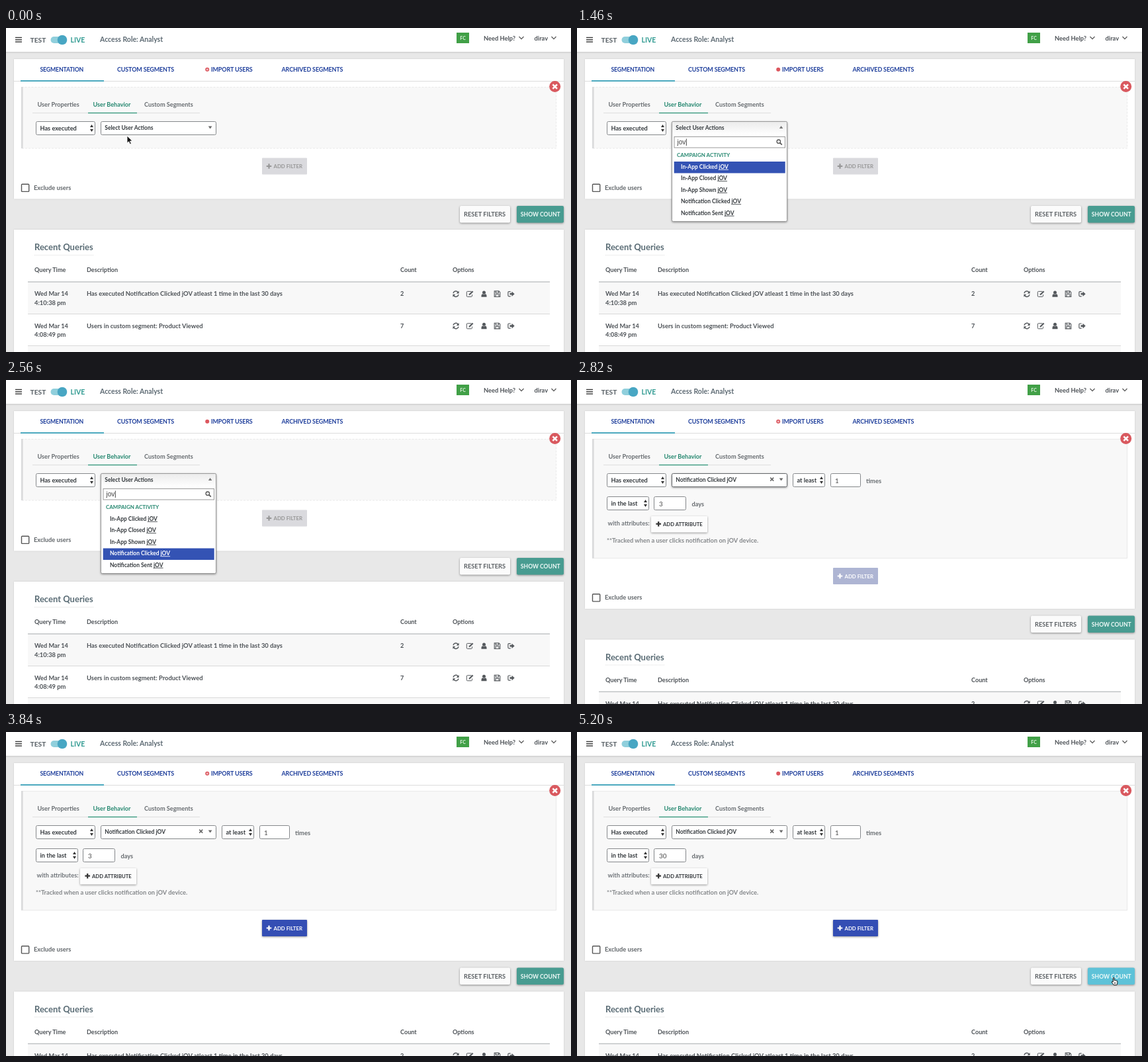
Animation, 854 px wide and 490 px high, one loop 5220 ms. Source, as an HTML page:

```html
<!DOCTYPE html>
<html lang="en">
<head>
<meta charset="utf-8">
<title>Segmentation</title>
<style>
  html, body { margin: 0; width: 100%; height: 100%; overflow: hidden; background: #e8e8e8; }
  svg { display: block; width: 854px; height: 490px; }
  text { font-family: Lato, "Open Sans", sans-serif; font-weight: 700; }
  .raised { filter: drop-shadow(0 1px 1.5px rgba(0, 0, 0, .4)); }
  .card { filter: drop-shadow(0 0 1px rgba(0, 0, 0, .12)); }
  .u { text-decoration: underline; }
</style>
</head>
<body>
<svg id="stage" viewBox="0 0 854 490" xmlns="http://www.w3.org/2000/svg"></svg>
<script>
const LOOP = 5220, PULSE = 560, SHIFT = 87.5, OPENED = 320, CHOSEN = 2730;
const INK = '#4d5257', DARK = '#34393d', BLUE = '#1f3f9c', GREEN = '#24876f', PICK = '#3453b4';

const text = (x, y, s, size = 9.2, fill = INK, extra = '') =>
  `<text x="${x}" y="${y}" font-size="${size}" fill="${fill}" ${extra}>${s}</text>`;
const rect = (x, y, w, h, fill, extra = '') =>
  `<rect x="${x}" y="${y}" width="${w}" height="${h}" fill="${fill}" ${extra}/>`;
const line = (d, stroke, width = 1, extra = '') =>
  `<path d="${d}" fill="none" stroke="${stroke}" stroke-width="${width}" ${extra}/>`;
const shape = (d, fill, extra = '') => `<path d="${d}" fill="${fill}" ${extra}/>`;
const group = (id, body, extra = '') => `<g id="${id}" ${extra}>${body}</g>`;
const field = (x, y, w, id = '') =>
  rect(x + .5, y + .5, w - 1, 20, '#fff', `rx="2" stroke="#85888b" ${id && `id="${id}"`}`);
const plus = (x, y, fill) =>
  line(`M${x - 3.8} ${y}h7.6M${x} ${y - 3.8}v7.6`, fill, 2.2);
const select = (x, y, w, label) => field(x, y, w) + text(x + 6.5, y + 13.5, label, 9.2, DARK) +
  shape(`M${x + w - 8} ${y + 9}l2.5 -4l2.5 4zM${x + w - 8} ${y + 12}l2.5 4l2.5 -4z`, '#333');
const chevron = x => line(`M${x} 13l3.5 3.7l3.5 -3.7`, '#555', 1.2);

function header() {
  return rect(0, 36, 854, 1, '#cfcfcf') + rect(0, 37, 854, 1.5, '#dedede') + rect(0, 0, 854, 36, '#fff') +
    line('M14 14.5h10M14 17.8h10M14 21.1h10', '#444', 1.5) +
    text(36.5, 21.5, 'TEST', 10.3, '#555d63') +
    rect(67.5, 13, 22, 10, '#90cfdc', 'rx="5"') + '<circle cx="85" cy="18" r="7.3" fill="#48a6c3"/>' +
    text(97.5, 21.5, 'LIVE', 10.5, '#339c93') +
    text(142, 21.3, 'Access Role: Analyst', 10.5, '#5d6a73') +
    rect(681, 7, 19, 16, '#41a047') +
    text(690.6, 17.6, 'FC', 7, '#e4f3e4', 'text-anchor="middle"') +
    text(722, 18.6, 'Need Help?', 9.3) + chevron(775.5) +
    text(798.5, 18.6, 'dirav', 9.3) + chevron(824.5);
}

function tabs() {
  const tab = (x, s) => text(x, 66.3, s, 9, BLUE, 'letter-spacing="-.15"');
  return rect(12, 80, 831, 1, '#dcdcdc') + rect(22, 79, 126, 2, '#4ba9bf') +
    text(51.5, 66.3, 'SEGMENTATION', 8.7, BLUE, 'letter-spacing="-.15"') +
    tab(168, 'CUSTOM SEGMENTS') + tab(310, 'IMPORT USERS') + tab(416.5, 'ARCHIVED SEGMENTS') +
    '<circle cx="304.2" cy="62.8" r="3" fill="#dc565e"/>' +
    '<circle id="pulse" cx="304.2" cy="62.8" r="1.5" fill="#f0b9bd"/>';
}

function panel() {
  return rect(23.5, 89.5, 808, 92.5, '#f8f8f8', 'id="panel" stroke="#e9e9e9" stroke-dasharray="3 2"') +
    rect(23, 89, 2.6, 93, '#d9dadb', 'id="edge"') +
    '<circle cx="829.7" cy="88.6" r="8.5" fill="#d9595f"/>' +
    line('M826.4 85.3l6.6 6.6M833 85.3l-6.6 6.6', '#fff', 2.6) +
    rect(40, 128, 253, 1, '#dedede') + rect(124, 127.8, 74, 1.4, '#38997f') +
    text(47.5, 118.7, 'User Properties', 9.15, '#676c70') +
    text(131.5, 118.7, 'User Behavior', 9.1, GREEN) +
    text(209, 118.7, 'Custom Segments', 9.2, '#676c70') +
    select(45, 141, 90, 'Has executed') +
    field(143, 141, 175, 'action') +
    text(149.3, 154, 'Select User Actions', 8.5, DARK, 'id="label"') +
    shape('M305.8 148.5h5.6l-2.8 4z', '#666');
}

function details() {
  const digits = (x, y, id, s) => text(x, y, s, 9.9, '#484848', `id="${id}" style="font-weight:400"`);
  return line('M292.2 147.6l5 5M297.2 147.6l-5 5', '#666', 1.5) +
    select(326, 141, 49, 'at least') + field(383, 141, 46) + digits(390, 155.5, 'times', '1') +
    text(437, 155.6, 'times', 9.4, '#666b6f') +
    select(45, 176, 64, 'in the last') + field(116, 176, 49, 'dayBox') + digits(124, 190.5, 'days', '3') +
    rect(135.8, 181.5, 1, 11, '#333', 'id="dayCaret"') +
    text(173.5, 190.6, 'days', 9.2, '#666b6f') +
    text(46.5, 220.3, 'with attributes:', 9.3, '#70757a') +
    rect(112, 206, 85, 24.5, '#fcfcfc', 'class="raised" rx="1"') + plus(123.2, 217.7, '#333') +
    text(130, 220.7, 'ADD ATTRIBUTE', 7.7, '#33373b') +
    text(45, 246.2, '**Tracked when a user clicks notification on jOV device.', 9.32, '#85888b');
}

function icons(y) {
  const c = '#55595d';
  const arc = 'M-4 -1A4 4 0 0 1 3.2 -2.5M4 1A4 4 0 0 1 -3.2 2.5';
  const at = (x, body) => `<g transform="translate(${x} ${y})">${body}</g>`;
  return at(680, line(arc, c, 1.5) + shape('M4.6 -4.6v4h-4zM-4.6 4.6v-4h4z', c)) +
    at(701, line('M2.5 -3.8h-6a1.2 1.2 0 0 0 -1.2 1.2v5.6a1.2 1.2 0 0 0 1.2 1.2h5.8a1.2 1.2 0 0 0 1.2 -1.2v-2', c) +
      line('M-1 1.4L4.7 -4', c, 2.1)) +
    at(722.5, `<circle cy="-2.3" r="2.5" fill="${c}"/>` + shape('M-4 4.6v-2q0 -2.4 2 -2.6q2 1.2 4 0q2 .2 2 2.6v2z', c)) +
    at(742.5, line('M-4.3 -4.3h6.8l1.8 1.8v6.8h-8.6zM-2.3 -4v2.7h4.3v-2.7M-2.5 4v-3.2h5v3.2', c, 1.1)) +
    at(763.5, line('M-.8 -3.6h-2.6q-1.2 0 -1.2 1.2v4.8q0 1.2 1.2 1.2h2.6', c, 1.2) +
      shape('M-2 -1.4h3v-2.4l4.2 3.8l-4.2 3.8v-2.4h-3z', c));
}

function lower() {
  const row = (y, clock, desc, count) =>
    text(43, y, 'Wed Mar 14') + text(43, y + 13.3, clock, 9.4) +
    text(122, y, desc, 9.4) + text(596, y, count) + icons(y - 3);
  const head = (x, s) => text(x, 369.4, s, 9.1);
  return rect(387, 196.5, 68, 25, '#dadada', 'id="add" rx="1"') +
    group('addInk', plus(397.5, 209, 'currentColor') +
      text(404.5, 212, 'ADD FILTER', 7.8, 'currentColor')) +
    rect(23.5, 236.2, 11.2, 11.2, '#fff', 'stroke="#555" stroke-width="1.4" rx="1"') +
    text(42, 244.8, 'Exclude users', 9.3, '#62676b') +
    rect(686, 269, 76, 25.5, '#fbfbfb', 'class="raised" rx="2"') +
    text(692, 285.3, 'RESET FILTERS', 9.25, '#5c6165') +
    rect(772, 269, 71, 25.5, '#489c91', 'id="count" class="raised" rx="2"') +
    text(777.8, 285.1, 'SHOW COUNT', 8.6, '#f2fbf9') +
    rect(12, 305, 831, 260, '#fff', 'class="card"') +
    text(43, 336, 'Recent Queries', 13, '#5a6c75') +
    line('M43 343.5h90', '#ddd', 1, 'stroke-dasharray="1 1"') +
    head(43, 'Query Time') + head(122, 'Description') + head(596, 'Count') + head(675, 'Options') +
    rect(33, 384, 789, 48, '#f8f8f8') + rect(33, 383.3, 789, 1.3, '#b9bcbe') +
    rect(33, 432, 789, 1, '#d9d9d9') + rect(33, 480.5, 789, 48, '#f8f8f8') + rect(33, 480, 789, 1, '#d9d9d9') +
    row(405.2, '4:10:38 pm', 'Has executed Notification Clicked jOV atleast 1 time in the last 30 days', '2') +
    row(453.6, '4:08:49 pm', 'Users in custom segment: Product Viewed', '7');
}

// Entries starting with # are group headings.
const ALL = ['#LIFECYCLE', 'App/Site Opened', 'Viewed Web Page', '#ACQUISITION', 'INSTALL', '#UNINSTALL',
  'Device Uninstall', '#REACHABILITY', 'Accepted Web Push Soft-ask', 'Allowed Web Push Subscription',
  'Closed Web Push Soft-ask', 'Denied Web Push Subscription', 'Dismissed Web Push Subscription',
  'Displayed Web Push Subscription', 'Overlay clicked in 1-click HTTP'];
const MATCHES = ['#CAMPAIGN ACTIVITY', 'In-App Clicked', 'In-App Closed', 'In-App Shown',
  'Notification Clicked', 'Notification Sent'];

const list = (items, prefix, tail = '') => items.map((s, i) => {
  const y = 195.3 + 17.5 * i;
  return s[0] === '#' ? text(151, y, s.slice(1), 8, GREEN)
    : text(157, y, s + tail, 8.45, DARK, `id="${prefix}${i}"`);
}).join('');

function dropdown() {
  return rect(143.5, 141.5, 174, 325.5, '#fff', 'id="box" class="raised" rx="2" stroke="#9a9a9a"') +
    rect(144, 142, 173, 20, 'url(#fade)', 'rx="2"') +
    text(149.3, 154, 'Select User Actions', 8.5, DARK) +
    shape('M305.8 152h5.6l-2.8 -4z', '#777') +
    rect(147, 164.5, 167.5, 16.5, '#fff', 'stroke="#999"') +
    '<circle cx="304.8" cy="171.7" r="2.7" fill="none" stroke="#555" stroke-width="1.3"/>' +
    line('M306.8 173.7l3 3', '#555', 1.7) +
    text(151.5, 176, '', 10, '#444', 'id="typed" style="font-family:\'Liberation Sans\',Arial,sans-serif;font-weight:400"') +
    rect(0, 167.5, 1, 10.5, '#444', 'id="caret"') +
    rect(146.7, 202, 168, 17.5, PICK, 'id="pick"') +
    group('all', list(ALL, 'a') + text(157, 451, 'subscription', 8.45, DARK) +
      text(157, 467.5, 'Overlay shown in 1-click HTTP', 8.45, DARK), 'clip-path="url(#crop)"') +
    group('found', list(MATCHES, 'm', ' <tspan class="u">jOV</tspan>'));
}

const cursors = group('arrow',
    shape('M0 0v11.2l2.6 -2.4l1.8 4l2 -.9l-1.8 -3.9h3.5z', '#111', 'stroke="#fff" stroke-width=".9"')) +
  group('beam', line('M-2 -5.5q2 0 2 1.5v8q0 1.5 -2 1.5M2 -5.5q-2 0 -2 1.5M2 5.5q-2 0 -2 -1.5', '#333')) +
  group('hand', shape('M-1.7 -5q1 -1.2 1.8 0v3.7q.9 -.8 1.7 .2q1 -.6 1.6 .3q1.4 -.4 1.4 1v2.3q0 1.5 -1 3.2h-4.5q-1.6 -2 -3.2 -4.6q.5 -1.4 2.2 -.1z',
    '#fff', 'stroke="#111" stroke-width="1"') + line('M.4 1.5v2.5M2 1.5v2.5', '#111', .7));

const stage = document.getElementById('stage');
stage.innerHTML = `<defs>
  <linearGradient id="fade" x2="0" y2="1"><stop stop-color="#ececec"/><stop offset="1" stop-color="#fff"/></linearGradient>
  <clipPath id="crop"><rect x="144" y="184" width="173" height="280.5"/></clipPath></defs>` +
  rect(0, 0, 854, 490, '#e8e8e8') + header() +
  rect(12, 47, 831, 211.5, '#fff', 'id="card" class="card"') +
  tabs() + panel() + group('details', details()) + group('lower', lower()) +
  group('dropdown', dropdown()) + cursors;

const el = {};
stage.querySelectorAll('[id]').forEach(e => el[e.id] = e);
const set = (id, name, value) => el[id].setAttribute(name, value);
const show = (id, on) => set(id, 'visibility', on ? 'visible' : 'hidden');
const clamp = v => Math.max(0, Math.min(1, v));
const ramp = (t, from, span) => clamp((t - from) / span);
const mix = (a, b, k) => `rgb(${a.map((v, i) => Math.round(v + (b[i] - v) * k))})`;
// Value of the last step whose time has come.
const step = (t, steps) => steps.reduce((v, s) => t >= s[0] ? s[1] : v, steps[0][1]);

// time, x, y of the pointer
const PATH = [[0, 183, 163], [120, 183, 163], [240, 188, 152], [980, 188, 152], [2980, 188, 152],
  [3100, 188, 152], [3380, 143, 187], [4180, 143, 187], [4560, 811, 376], [5220, 812, 377]];

function pointer(t) {
  const i = Math.max(1, PATH.findIndex(p => p[0] >= t));
  const [a, b] = [PATH[i - 1], PATH[i]];
  const k = ramp(t, a[0], b[0] - a[0]), e = k * k * (3 - 2 * k);
  return [a[1] + (b[1] - a[1]) * e, a[2] + (b[2] - a[2]) * e];
}

function draw(t) {
  const chosen = t >= CHOSEN, dy = chosen ? SHIFT : 0;
  set('lower', 'transform', `translate(0 ${dy})`);
  set('card', 'height', 211.5 + dy);
  set('panel', 'height', 92.5 + dy);
  set('panel', 'stroke-dasharray', chosen ? 'none' : '3 2');
  set('edge', 'height', 93 + dy);
  show('details', chosen);
  el.label.textContent = chosen ? 'Notification Clicked jOV' : 'Select User Actions';
  const focused = chosen && t < 3480;
  set('action', 'stroke', focused ? '#66696c' : '#85888b');
  set('action', 'class', focused ? 'raised' : '');

  const phase = t % PULSE;
  set('pulse', 'opacity', 1 - ramp(phase, 40, 80) + ramp(phase, 380, 80));

  // Dropdown
  const open = t >= OPENED && !chosen, found = t >= 1260;
  const typed = step(t, [[0, ''], [1020, 'j'], [1140, 'jo'], [1220, 'jov']]);
  el.dropdown.style.display = open ? '' : 'none';
  if (open) {
    el.typed.textContent = typed;
    set('caret', 'x', 152 + el.typed.getComputedTextLength());
    set('box', 'height', found ? 151 : 325.5);
    show('all', !found);
    show('found', found);
    const row = step(t, [[0, 1], [1780, 2], [1920, 3], [2180, 4]]);
    set('pick', 'y', 184.5 + 17.5 * row);
    set('a1', 'fill', '#fff');
    for (let i = 1; i < MATCHES.length; i++) set('m' + i, 'fill', i === row ? '#fff' : DARK);
  }

  // Buttons
  const k = ramp(t, 2740, 300);
  set('add', 'fill', mix([218, 218, 222], [52, 78, 180], k));
  set('add', 'class', k > .6 ? 'raised' : '');
  set('addInk', 'color', k ? '#fff' : '#969696');
  const hover = ramp(t, 4530, 60), press = ramp(t, 5080, 80);
  set('count', 'fill', press ? mix([91, 162, 152], [94, 194, 216], press) : mix([72, 156, 145], [91, 162, 152], hover));

  el.days.textContent = t < 4020 ? '3' : '30';
  const editing = t >= 3480 && t < 5080;
  const blinkOn = t >= 4540 ? t < 4800 : (t - 3480) % 400 < 200;
  show('dayCaret', chosen && editing && blinkOn);
  set('dayCaret', 'x', t < 4020 ? 130 : 135.8);

  // Pointer
  const [x, y] = pointer(t);
  const look = step(t, [[0, 'arrow'], [980, ''], [3080, 'arrow'], [3360, 'beam'], [3760, ''],
    [4180, 'arrow'], [4530, 'hand']]);
  for (const id of ['arrow', 'beam', 'hand']) {
    show(id, id === look);
    set(id, 'transform', `translate(${x} ${y})`);
  }
}

const start = performance.now();
function tick() {
  const t = (performance.now() - start) % LOOP;
  draw(Math.floor(t / 20) * 20);
  requestAnimationFrame(tick);
}
draw(0);
requestAnimationFrame(tick);
</script>
</body>
</html>
```
